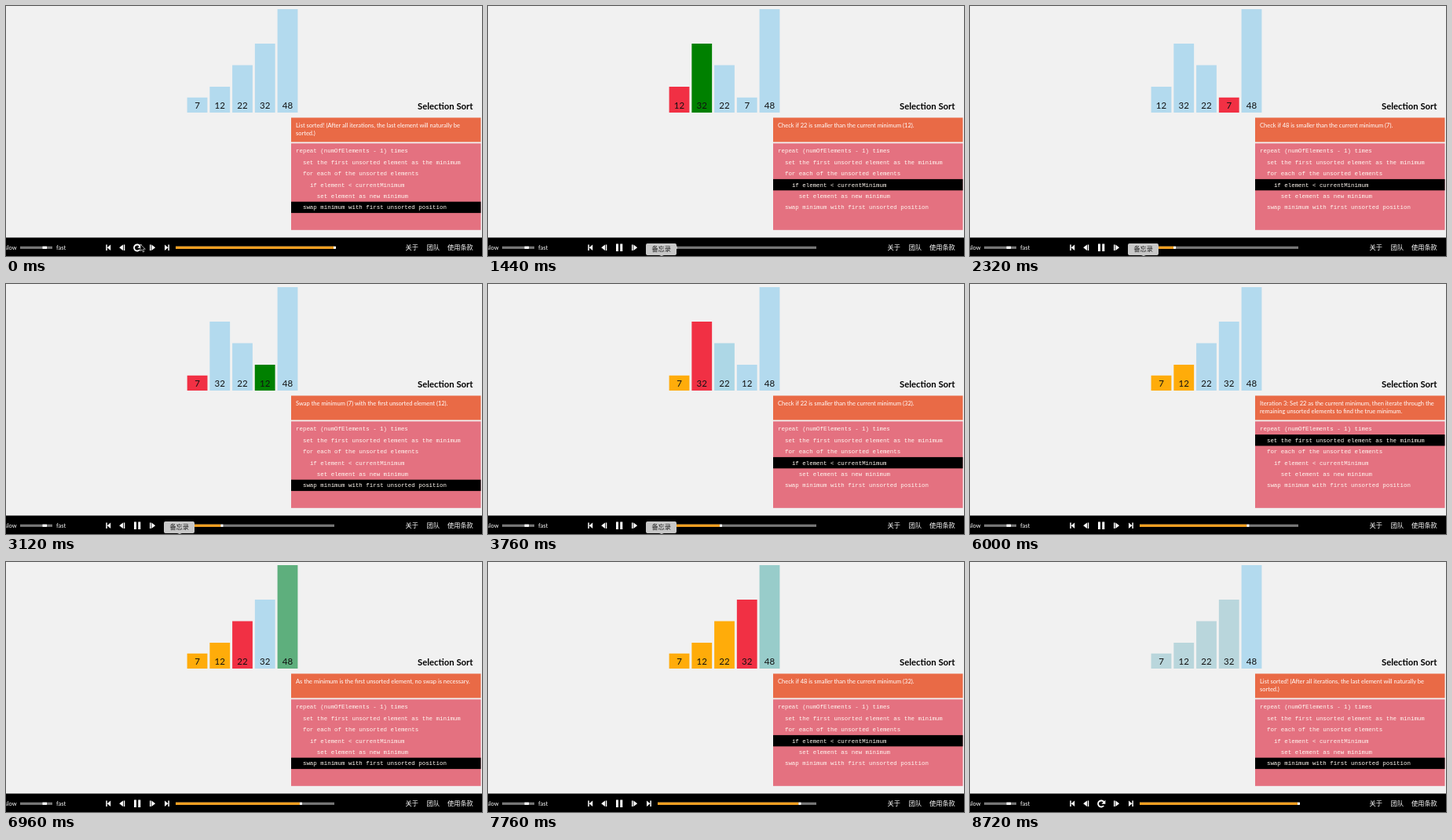
Animation of 606 by 319 pixels, one loop 8.8 s. Source, as an HTML page:

```html
<!DOCTYPE html>
<html lang="en">
<head>
<meta charset="utf-8">
<title>Selection Sort</title>
<style>
  html, body { margin: 0; width: 100%; height: 100%; overflow: hidden; background: #f1f1f1; }
  svg { position: absolute; left: 0; top: 0; }
  text { font-family: Lato, sans-serif; white-space: pre; }
  .bars text { font-size: 11.5px; text-anchor: middle; fill: #111; }
  .code text { font: 7.45px "Liberation Mono", monospace; fill: #fff8f0; }
  .controls { fill: #fff; }
  .controls text { font-size: 7.5px; }
  .controls .cjk, .tip text { font: 500 8.2px "Noto Sans CJK SC", "Noto Sans CJK", sans-serif; }
  .tip text { fill: #222; text-anchor: middle; }
  #status { position: absolute; left: 369px; top: 148px; width: 226px; color: #fff;
            font: 7.5px/10.4px Lato, sans-serif; }
</style>
</head>
<body>
<svg width="606" height="319" viewBox="0 0 606 319">
  <g class="bars" id="bars"></g>
  <text x="594.5" y="132" text-anchor="end" font-size="11.3" font-weight="700">Selection Sort</text>
  <rect x="363" y="142.5" width="241.5" height="31" fill="#e96a46"/>
  <rect x="363" y="175.3" width="241.5" height="110.5" fill="#e47180"/>
  <rect id="lineMark" x="363" width="241.5" height="14.4"/>
  <g class="code" id="code"></g>

  <rect y="295.5" width="606" height="24"/>
  <g class="controls">
    <text x="-1.5" y="310.5">slow</text>
    <rect x="18" y="306.7" width="41" height="3.2" fill="#777"/>
    <rect x="46.5" y="306.7" width="5.5" height="3.2"/>
    <text x="64" y="310.5">fast</text>
    <path d="M127.3 304.5h1.5v7.5h-1.5zM133.2 304.5v7.5l-4.4-3.75z"/>
    <path d="M149 304.5v7.5l-4.8-3.75zM149.8 304.5h1.5v7.5h-1.5z"/>
    <path id="pause" d="M163 303.5h3v9.5h-3zM168.3 303.5h3v9.5h-3z"/>
    <g id="replay">
      <path d="M170.2 311a4 4 0 1 1 .3-4.6" fill="none" stroke="#fff" stroke-width="1.9"/>
      <path d="M172.4 303.7v5h-5z"/>
    </g>
    <path d="M183 304.5h1.5v7.5h-1.5zM185.3 304.5v7.5l4.8-3.75z"/>
    <path d="M202 304.5v7.5l4.4-3.75zM206.4 304.5h1.5v7.5h-1.5z"/>
    <rect x="216" y="306.7" width="202" height="3.2" fill="#777"/>
    <rect id="progress" x="216" y="306.7" height="3.2" fill="#f9a01f"/>
    <rect id="handle" y="306.7" width="3" height="3.2"/>
    <text class="cjk" x="508.5" y="311">关于</text>
    <text class="cjk" x="535.5" y="311">团队</text>
    <text class="cjk" x="562" y="311">使用条款</text>
  </g>
  <g class="tip" id="tip">
    <path d="M203 303h35q2 0 2 2v11q0 2-2 2h-14l-3 1-3-1h-15q-2 0-2-2v-11q0-2 2-2z" fill="#c8c8c8"/>
    <text id="tipText" x="220.7" y="313.4"></text>
  </g>
  <path id="cursor" d="M0 0v8.6l2-1.8 1.4 3.2 1.5-.7-1.4-3.1h2.8z" stroke="#fff" stroke-width=".6"/>
</svg>
<div id="status"></div>

<script>
const LOOP = 8800, START = 591, STEP = 283;
const BASE = [179, 218, 238], CHECK = [0, 128, 0], MIN = [241, 48, 68], SORTED = [255, 172, 10];
const VALUES = [12, 32, 22, 7, 48];
const CODE = [
  'repeat (numOfElements - 1) times',
  '  set the first unsorted element as the minimum',
  '  for each of the unsorted elements',
  '    if element < currentMinimum',
  '      set element as new minimum',
  '  swap minimum with first unsorted position'
];
const $ = id => document.getElementById(id);

function add(parent, tag, attrs, content = '') {
  const el = document.createElementNS('http://www.w3.org/2000/svg', tag);
  for (const key in attrs) el.setAttribute(key, attrs[key]);
  el.textContent = content;
  return parent.appendChild(el);
}

// Every step stores the order of the values, their colours, a message and the active code line.
function selectionSort(values) {
  const list = [...values], steps = [], sorted = {};
  const push = (text, line, marks = {}) =>
    steps.push({ order: [...list], colors: { ...sorted, ...marks }, text, line });

  push('', -1);
  for (let i = 0; i < list.length - 1; i++) {
    let m = i;
    push(`Iteration ${i + 1}: Set ${list[i]} as the current minimum, then iterate through the remaining unsorted elements to find the true minimum.`,
      1, { [list[i]]: MIN });
    for (let j = i + 1; j < list.length; j++) {
      push(`Check if ${list[j]} is smaller than the current minimum (${list[m]}).`,
        3, { [list[m]]: MIN, [list[j]]: CHECK });
      if (list[j] < list[m]) {
        m = j;
        push(`Set ${list[m]} as the new minimum.`, 4, { [list[m]]: MIN });
      }
    }
    const first = list[i], min = list[m];
    if (m !== i) {
      const text = `Swap the minimum (${min}) with the first unsorted element (${first}).`;
      const marks = { [first]: CHECK, [min]: MIN };
      push(text, 5, marks);
      [list[i], list[m]] = [min, first];
      push(text, 5, marks);
    } else {
      push('As the minimum is the first unsorted element, no swap is necessary.', 5, { [min]: MIN });
    }
    sorted[min] = SORTED;
    push(`${min} is now considered sorted.`, 5);
  }
  steps.push({ order: [...list], colors: {}, line: 5,
    text: 'List sorted! (After all iterations, the last element will naturally be sorted.)' });
  return steps;
}

const steps = selectionSort(VALUES), last = steps.length - 1;

const bars = VALUES.map(value => {
  const group = add($('bars'), 'g', {}), height = value * 2.75;
  const rect = add(group, 'rect', { y: 136 - height, width: 25.8, height });
  add(group, 'text', { x: 12.9, y: 131 }, value);
  return { value, group, rect };
});
CODE.forEach((line, i) => {
  const text = line.trimStart();
  add($('code'), 'text', { x: 369 + (line.length - text.length) * 4.47, y: 187.4 + i * 14.4 }, text);
});

const mix = (a, b, k) => a + (b - a) * k;
const clamp = x => Math.min(1, Math.max(0, x));
const ease = x => x < .5 ? 4 * x ** 3 : 1 - 4 * (1 - x) ** 3;
const show = (id, on) => $(id).setAttribute('visibility', on ? 'visible' : 'hidden');

function drawSort(t) {
  const elapsed = (t - START) / STEP;
  const index = elapsed < 0 ? last : Math.min(last, Math.floor(elapsed));
  const k = elapsed < 0 ? 1 : ease(clamp(elapsed - index));
  const now = steps[index], before = steps[index ? index - 1 : last];

  for (const { value, group, rect } of bars) {
    const slot = mix(before.order.indexOf(value), now.order.indexOf(value), k);
    const from = before.colors[value] || BASE, to = now.colors[value] || BASE;
    group.setAttribute('transform', `translate(${230.6 + slot * 28.75})`);
    rect.setAttribute('fill', `rgb(${from.map((c, i) => Math.round(mix(c, to[i], k)))})`);
  }
  if ($('status').textContent !== now.text) $('status').textContent = now.text;
  show('lineMark', now.line >= 0);
  $('lineMark').setAttribute('y', 177.7 + now.line * 14.4);

  const done = 201 * index / last;
  $('progress').setAttribute('width', done);
  $('handle').setAttribute('x', 216 + done);
  show('replay', index === last);
  show('pause', index !== last);
}

function drawPointer(t) {
  const leaving = t < 2000;
  const k = ease(leaving ? clamp((t - 680) / 320) : clamp((t - 4740) / 130));
  const x = leaving ? mix(171, 221, k) : mix(221, 245.5, k);
  const y = leaving ? mix(304, 319, k) : mix(319, 274, k);
  $('cursor').setAttribute('transform', `translate(${x} ${y})`);
  show('cursor', t < 1000 || (t > 4740 && t < 5300));

  show('tip', t >= 1000 && t < 4990);
  $('tip').setAttribute('opacity', clamp((4990 - t) / 190));
  $('tipText').textContent = t < 4700 ? '备忘录' : '通讯录';
}

function frame() {
  const t = performance.now() % LOOP;
  drawSort(t);
  drawPointer(t);
  requestAnimationFrame(frame);
}
frame();
</script>
</body>
</html>
```
